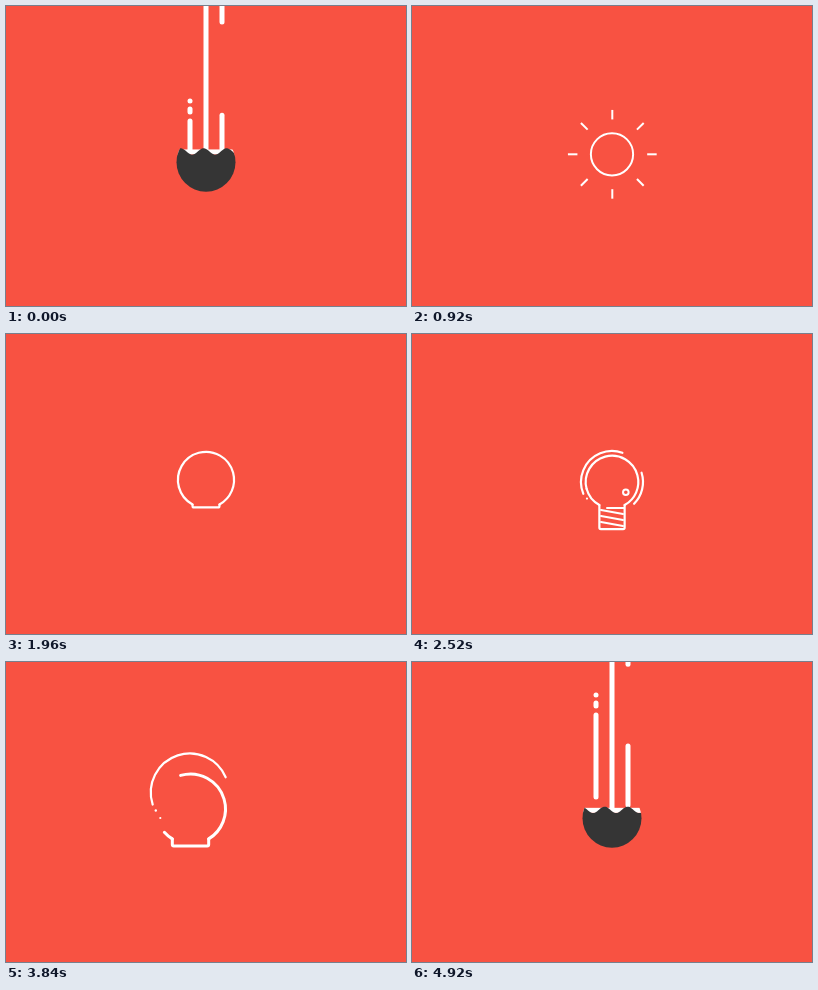
An HTML page with a canvas for the animation above (4.96 s loop, 400x300 px).

```html
<!DOCTYPE html>
<html lang="en">
<head>
<meta charset="utf-8">
<title>Sun, bulb, bowl</title>
<style>
  html, body { margin: 0; width: 100%; height: 100%; overflow: hidden; background: #f85242; }
  canvas { display: block; width: 400px; height: 300px; }
</style>
</head>
<body>
<canvas id="stage" width="400" height="300"></canvas>
<script>
const LOOP = 4960, TAU = Math.PI * 2, RED = '#f85242', DARK = '#353535', WHITE = '#fff';
const c = document.getElementById('stage').getContext('2d');

const rad = deg => deg * Math.PI / 180;
const mix = (a, b, k) => a + (b - a) * k;
const linear = k => k;
const smooth = k => k * k * (3 - 2 * k);
const accel = k => k * k;
const back = k => 1 + 2.7 * (k - 1) ** 3 + 1.7 * (k - 1) ** 2;

// Progress from 0 to 1 between two times.
const ramp = (t, from, to, ease = smooth) => ease(Math.min(1, Math.max(0, (t - from) / (to - from))));

function disc(x, y, r, color = WHITE) {
  if (r <= 0) return;
  c.fillStyle = color;
  c.beginPath();
  c.arc(x, y, r, 0, TAU);
  c.fill();
}

function line(x0, y0, x1, y1, w, color = WHITE, cap = 'round') {
  c.lineCap = cap;
  c.lineWidth = w;
  c.strokeStyle = color;
  c.beginPath();
  c.moveTo(x0, y0);
  c.lineTo(x1, y1);
  c.stroke();
}

function arc(x, y, r, from, to, w = 2.2) {
  if (to <= from || r <= 0) return;
  c.lineCap = 'round';
  c.lineWidth = w;
  c.strokeStyle = WHITE;
  c.beginPath();
  c.arc(x, y, r, rad(from), rad(to));
  c.stroke();
}

function rays(x, y, r0, r1, w) {
  if (r1 - r0 < 0.3) return;
  for (let a = 0; a < TAU; a += TAU / 8) {
    const dx = Math.cos(a), dy = Math.sin(a);
    line(x + dx * r0, y + dy * r0, x + dx * r1, y + dy * r1, w, WHITE, 'butt');
  }
}

function stream(x, y0, y1, end, w = 5) {
  y1 = Math.min(y1, end);
  if (y1 - y0 >= w) line(x, y0 + w / 2, x, y1 - w / 2, w);
  else if (y1 > y0) disc(x, (y0 + y1) / 2, w / 2);
}

// u counts from the start of the loop and is negative before it.
function streams(u, end) {
  const landed = u + 680, tail = 111 + 1.55 * u;
  stream(mix(202, 200, ramp(u, -680, -200)), Math.max(-10, 1.55 * (u - 120)), 184 + 1.55 * landed, end);

  stream(185.5, 44 + landed, 71 + landed, end);
  stream(184, u + 380, u + 440, end);
  stream(184, tail, tail + 87, end - 1);
  stream(184, tail - 12, tail - 4, end);
  stream(184, tail - 20, tail - 15, end);

  const slow = 106 + 0.63 * u, tip = 18 + 0.4 * u + 0.0015 * u * u;
  stream(216.5, 54 + 0.63 * landed, 62 + 0.63 * landed, end);
  stream(216, slow, slow + 64, end);
  if (u > -60) stream(216, tip - 60, tip, end);
}

function bowl(u) {
  const dip = 30 * (ramp(u, -760, -590) - ramp(u, -590, -340));
  const shrink = ramp(u, 430, 600);
  const level = 145.5 - 0.06 * u, top = level + dip;
  streams(u, top + 3);

  if (Math.abs(u + 680) < 40) {
    line(194.5, 199.3, 200, 200.3, 1.8);
    line(205.5, 200, 211, 198.2, 2, DARK);
  }
  if (level > 186) return;

  c.save();
  c.beginPath();
  c.arc(200, mix(156.2, 149.5, shrink) + dip, mix(29.5, 20.5, shrink), 0, TAU);
  c.clip();
  c.fillStyle = WHITE;
  c.fillRect(160, top - 2, 80, 5);
  const amp = Math.min(3.2, (186 - level) / 4);
  c.fillStyle = DARK;
  c.beginPath();
  c.moveTo(240, 260);
  c.lineTo(160, 260);
  for (let x = 160; x <= 240; x++) c.lineTo(x, top + amp * Math.cos((x - 186 - 0.125 * u) * TAU / 23));
  c.fill();
  c.restore();
}

function specks(t) {
  const out = ramp(t, 480, 600), size = 1 - ramp(t, 600, 700);
  for (const side of [-1, 1]) {
    disc(198 + 34.5 * side * out, 150 - 26 * out, 1.8 * size, DARK);
    disc(198 + 28.5 * side * out, 150 - 14 * out, size, DARK);
  }
}

function sun(t) {
  disc(200, 149.5, mix(20.5, 255, ramp(t, 620, 820, accel)), DARK);
  disc(200, 149, 255 * ramp(t, 700, 920, accel), RED);

  const grow = ramp(t, 600, 1040, k => back(k * k) * k + 0 * k), fade = ramp(t, 1480, 1680);
  const y = mix(149.5, 148, grow);
  arc(200, y, mix(1.7, 26, grow), 0, 360, mix(1, 2.2, grow));
  rays(200.3, y, mix(10.5, 41, grow) + 3 * fade, mix(14, 52, grow) - 8 * fade, 2);
}

// Round wall with a socket below; the wall is missing between gap0 and gap1 degrees.
function outline(x, y, r, neck, h, gap0, gap1, w) {
  arc(x, y, r, 90 + neck, gap0, w);
  arc(x, y, r, gap1, 450 - neck, w);
  if (h <= 0) return;
  const half = r * Math.sin(rad(neck)), top = y + r * Math.cos(rad(neck)), low = top + h;
  c.beginPath();
  c.moveTo(x - half, top);
  c.arcTo(x - half, low, x, low, 1.5);
  c.arcTo(x + half, low, x + half, top, 1.5);
  c.lineTo(x + half, top);
  c.stroke();
}

function threads(x, y, k) {
  if (k <= 0) return;
  line(x - 5, y, x - 5 + 17 * k, y, 2);
  for (let i = 0; i < 3; i++) {
    const top = y + 2 + i * 6;
    line(x - 11, top, x - 11 + 22 * k, top + 4 * k, 2);
  }
}

function orbit(t) {
  const len = ramp(t, 2240, 2480) - ramp(t, 2600, 2820);
  if (len <= 0) return;
  const spin = (t - 2520) * 0.57, speck = rad(146 + spin), bead = rad(35 + spin);
  arc(200, 148, 31, 157 + spin, 157 + spin + 132 * len);
  arc(200, 148, 31, spin - 18, spin - 18 + 62 * len);
  disc(200 + 30 * Math.cos(speck), 148 + 30 * Math.sin(speck), 1.1 * len);
  arc(200 + 17 * Math.cos(bead), 148.3 + 17 * Math.sin(bead), 2.8 * len, 0, 360, 2);
}

function bulb(t) {
  const pulse = Math.sin(Math.PI * ramp(t, 1720, 2040, linear));
  const open = ramp(t, 1740, 1960), grow = ramp(t, 2840, 3160), sink = ramp(t, 3940, 4180);
  const x = 200 - 15.5 * ramp(t, 3560, 3840);
  const y = mix(148, 147, grow) - 3 * pulse + 30 * sink;
  const r = (mix(26.3, 35, grow) + 2.5 * pulse) * (1 - sink);
  const neck = open * mix(28.7, 31.3, grow);
  const h = mix(24 * ramp(t, 1900, 2180), 7, grow) * (1 - sink);
  const gap0 = mix(165, 90 + neck, ramp(t, 3600, 4020));
  const gap1 = mix(165, 450 - neck, ramp(t, 3600, 4140, accel)) ;
  outline(x, y, r, neck, h, gap0, Math.max(gap0, gap1 + 38 * Math.sin(Math.PI * ramp(t, 3600, 4080, linear))), mix(2.2, 3, grow));
  threads(200, 174, ramp(t, 2100, 2360) - ramp(t, 2760, 2900));
  orbit(t);

  const shine = ramp(t, 2860, 3160), leave = ramp(t, 3400, 3640);
  rays(200, 148, 40 + 8 * shine + 15 * leave, 40 + 21 * shine + 2 * leave, 2.2);
}

// The loosened line that swings off to the left.
function coil(t) {
  const unwind = ramp(t, 3600, 3840), leave = ramp(t, 3840, 4140);
  const x = 183.8 - 38 * leave, y = mix(141, 130.5, unwind) - 19 * leave;
  arc(x, y, mix(35, 39, unwind), mix(162, 345, leave), 162 + 175 * unwind + 8 * leave);
  if (Math.abs(t - 3850) < 110) {
    disc(x - 34, y + 18, 1.2);
    disc(x - 29.5, y + 25.5, 1.1);
  }
}

function draw(t) {
  c.fillStyle = RED;
  c.fillRect(0, 0, 400, 300);
  if (t < 600) bowl(t);
  else if (t < 1720) sun(t);
  else if (t < 4180) {
    bulb(t);
    if (t > 3600) coil(t);
  }
  if (t > 4140) bowl(t - LOOP);
  if (t > 480 && t < 700) specks(t);
}

const start = performance.now();
function tick() {
  draw((performance.now() - start) % LOOP);
  requestAnimationFrame(tick);
}
tick();
</script>
</body>
</html>
```
